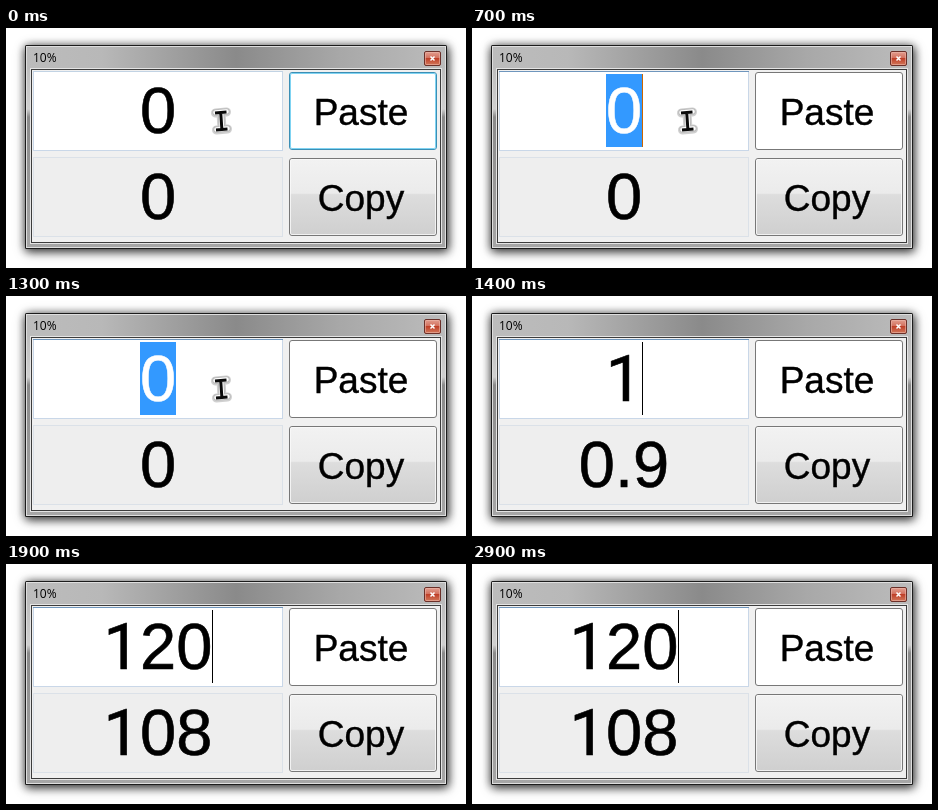
An HTML page that plays this animation: 460 by 240 pixels, repeating every 3300 ms.

```html
<!DOCTYPE html>
<html lang="en">
<head>
<meta charset="utf-8">
<title>Percent calculator</title>
<style>
html, body { margin: 0; width: 460px; height: 240px; overflow: hidden; background: #fff; }
svg { display: block; }
text { font-family: "Liberation Sans", Arial, sans-serif; text-anchor: middle; }
.number { font-size: 65px; stroke-width: .6; }
.one { font-family: Roboto, sans-serif; }
.label { font-size: 37px; stroke: #000; stroke-width: .4; }
.title { font: 12px "Open Sans", "Noto Sans", sans-serif; text-anchor: start; }
.window { filter: drop-shadow(1px 2px 5px rgba(0,0,0,.7)) drop-shadow(0 1px 5px rgba(0,0,0,.4)); }
</style>
</head>
<body>
<svg width="460" height="240" viewBox="0 0 460 240">
  <defs>
    <linearGradient id="frame" x2="0" y2="1">
      <stop offset="0" stop-color="#b4b4b4"/>
      <stop offset=".31" stop-color="#d0d0d0"/>
      <stop offset=".35" stop-color="#8a8a8a"/>
      <stop offset="1" stop-color="#a6a6a6"/>
    </linearGradient>
    <linearGradient id="bar">
      <stop offset="0" stop-color="#bcbcbc"/>
      <stop offset=".18" stop-color="#b8b8b8"/>
      <stop offset=".5" stop-color="#8a8a8a"/>
      <stop offset=".75" stop-color="#a8a8a8"/>
      <stop offset="1" stop-color="#bcbcbc"/>
    </linearGradient>
    <linearGradient id="face" x2="0" y2="1">
      <stop offset="0" stop-color="#f2f2f2"/>
      <stop offset=".45" stop-color="#ebebeb"/>
      <stop offset=".47" stop-color="#dddddd"/>
      <stop offset="1" stop-color="#cfcfcf"/>
    </linearGradient>
    <linearGradient id="red" x2="0" y2="1">
      <stop offset="0" stop-color="#e3a092"/>
      <stop offset=".48" stop-color="#d26f5c"/>
      <stop offset=".5" stop-color="#bf4029"/>
      <stop offset="1" stop-color="#d37a5c"/>
    </linearGradient>
  </defs>

  <g class="window"><rect x="19" y="17" width="422" height="204" rx="1.5" fill="#1c1c1c"/></g>
  <rect x="20" y="18" width="420" height="202" fill="#dedede"/>
  <rect x="21" y="19" width="418" height="200" fill="url(#frame)"/>
  <rect x="21" y="19" width="418" height="22" fill="url(#bar)"/>
  <rect x="24.5" y="40.5" width="411" height="175" fill="none" stroke="#e4e4e4"/>
  <rect x="25.5" y="41.5" width="409" height="173" fill="#f0f0f0" stroke="#3c3c3c"/>
  <text class="title" x="27" y="34">10%</text>

  <rect x="418.5" y="23.5" width="16" height="14" rx="1.5" fill="url(#red)" stroke="#6b3029"/>
  <rect x="419.5" y="24.5" width="14" height="12" rx="1" fill="none" stroke="#edb8aa" stroke-opacity=".6"/>
  <path d="M424.5 28.5l4 4m0-4l-4 4" stroke="#fff" stroke-width="1.5"/>

  <rect x="27.5" y="43.5" width="249" height="79" fill="#fff" stroke="#c9d7e8"/>
  <path id="edge" d="M27 43.5H277"/>
  <rect x="27.5" y="129.5" width="249" height="79" fill="#eeeeee" stroke="#dbe1e8"/>

  <rect id="paste" x="283.5" y="44.5" width="147" height="77" rx="2.5" fill="#fff"/>
  <rect id="glow" x="284.5" y="45.5" width="145" height="75" rx="1.5" fill="none" stroke="#7fd3f2"/>
  <text class="label" x="355" y="97">Paste</text>
  <rect x="283.5" y="130.5" width="147" height="77" rx="2.5" fill="url(#face)" stroke="#777"/>
  <rect x="284.5" y="131.5" width="145" height="75" rx="1.5" fill="none" stroke="#fafafa" stroke-opacity=".8"/>
  <text class="label" x="355" y="183">Copy</text>

  <rect id="selection" x="134" y="46" width="36" height="73" fill="#3399ff"/>
  <text id="input" class="number" x="152" y="105"></text>
  <text id="output" class="number" x="152" y="191"></text>
  <rect id="caret" y="46" width="1" height="73"/>

  <g id="pointer" fill="none" stroke-linecap="round">
    <path d="M209.5 85l11-1M215 84.500l1 17M210.500 102l11-1" stroke="#777" stroke-opacity=".35" stroke-width="9"/>
    <path d="M209.500 84.500l11-1M215 84l1 17M210.500 101.500l11-1" stroke="#bbb" stroke-width="6.500"/>
    <path d="M209.500 84.500l11-1M215 84l1 17M210.500 101.500l11-1" stroke="#fff" stroke-width="4.500"/>
    <path d="M209 85l11.500-1M214.700 84.500l1.200 17M210 102l11.500-1" stroke="#0a0a0a" stroke-width="3" stroke-linecap="butt"/>
  </g>
</svg>
<script>
const LOOP = 3300;
const el = id => document.getElementById(id);
const show = (id, on) => el(id).setAttribute("visibility", on ? "visible" : "hidden");
const within = (t, from, to) => t >= from && t < to;

// The digit 1 is set in a face where it has no foot.
function write(id, text, color) {
  el(id).innerHTML = text.replace(/1/g, '<tspan class="one">1</tspan>');
  el(id).setAttribute("fill", color);
  el(id).setAttribute("stroke", color);
}

function draw(t) {
  const focused = t < 700;
  const selected = within(t, 700, 1400);
  const typed = t < 1400 ? "0" : t < 1600 ? "1" : t < 1900 ? "12" : "120";
  write("input", typed, selected ? "#fff" : "#000");
  write("output", String(typed * 90 / 100), "#000");

  show("selection", selected);
  show("pointer", t < 1400);
  show("glow", focused);
  el("paste").setAttribute("stroke", focused ? "#3c8fb5" : "#777");
  el("edge").setAttribute("stroke", focused ? "#c2d3e4" : "#6f96bd");

  // The caret follows the text and blinks when typing pauses.
  el("caret").setAttribute("x", 152 + typed.length * 18);
  el("caret").setAttribute("fill", selected ? "#cc6600" : "#000");
  show("caret", !focused && !within(t, 1300, 1400) && !within(t, 2400, 2900));
}

const start = performance.now();
function tick() {
  draw((performance.now() - start) % LOOP);
  requestAnimationFrame(tick);
}
tick();
</script>
</body>
</html>
```
